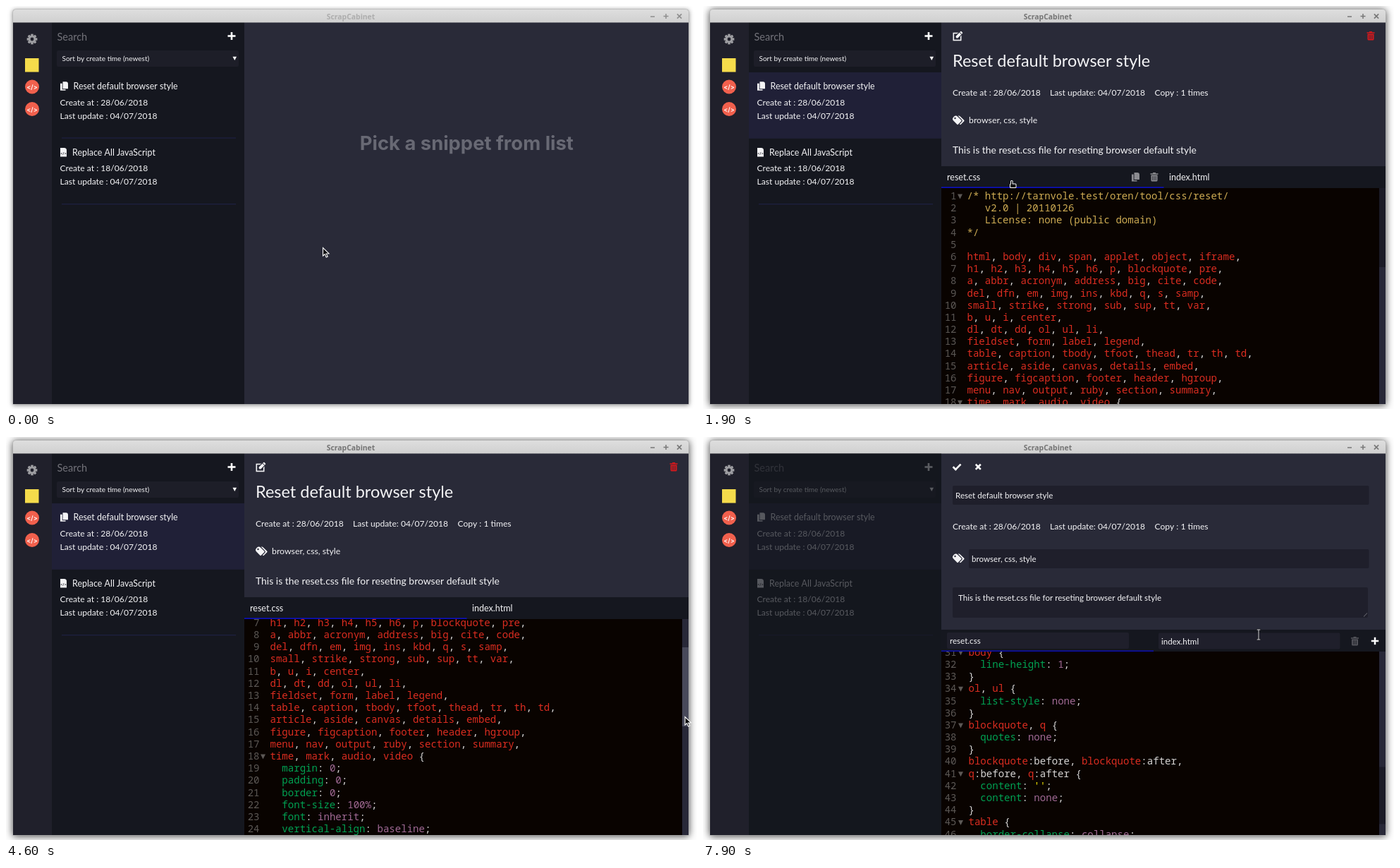
An HTML page with a canvas for the animation above (8000 ms loop, 980 by 571 pixels).

```html
<!DOCTYPE html>
<html lang="en">
<head>
<meta charset="utf-8">
<title>Snippet manager</title>
<style>
html, body { margin: 0; width: 100%; height: 100%; overflow: hidden; background: #fff; }
canvas { display: block; width: 980px; height: 571px; }
</style>
</head>
<body>
<canvas id="stage"></canvas>
<script>
const W = 980, H = 571, LOOP = 8000, STEP = 100;
const canvas = document.getElementById('stage');
const c = canvas.getContext('2d');
const dpr = window.devicePixelRatio || 1;
canvas.width = W * dpr;
canvas.height = H * dpr;

const UI = 'Lato, sans-serif', MONO = '"Noto Sans Mono", monospace';
const SIDE = '#20202b', LIST = '#15171f', PANEL = '#292a38', FIELD = '#1f1f2b';
const WHITE = '#f4f4f6', GREY = '#8b8b90', BLUE = '#0c10b4', TRACK = '#282838';
const CODE = { bg: '#090300', text: '#d6d5d4', num: '#5c5855', note: '#cdab53',
  tag: '#db2d20', prop: '#01a252', value: '#a16a94', string: '#fded02' };
const LINE = 17.19, CODE_SIZE = 14.07, CHAR = CODE_SIZE * .6;
const TITLE = 'Reset default browser style', TAGS = 'browser, css, style';
const ABOUT = 'This is the reset.css file for reseting browser default style';

// Moments when the state changes.
const FOCUS = 300, OPEN = 1300, GRAB = 3900, RELEASE = 5700, EDIT = 6800;
const GRIP_Y = 357.8, SCROLL_PER_PX = 2.86;

// Pointer path: start, end, then the place it reaches.
const home = { x: 449, y: 342 };
const moves = [
  [300, 1100, 288, 149],
  [1500, 1900, 438, 247],
  [1900, 2400, 735, 240],
  [2700, 3300, 492, 120],
  [3300, 3600, 966, 395],
  [3700, GRAB, 964, GRIP_Y],
  [GRAB, 4600, 962.5, 396],
  [4600, 5200, 958, 539.3],
  [5500, RELEASE, 957, 541.7],
  [RELEASE, 6600, 357, 37],
  [EDIT, 7200, 338, 38],
  [7300, 7900, 788, 280]
];

const css = `/* http://tarnvole.test/oren/tool/css/reset/
   v2.0 | 20110126
   License: none (public domain)
*/

html, body, div, span, applet, object, iframe,
h1, h2, h3, h4, h5, h6, p, blockquote, pre,
a, abbr, acronym, address, big, cite, code,
del, dfn, em, img, ins, kbd, q, s, samp,
small, strike, strong, sub, sup, tt, var,
b, u, i, center,
dl, dt, dd, ol, ul, li,
fieldset, form, label, legend,
table, caption, tbody, tfoot, thead, tr, th, td,
article, aside, canvas, details, embed,
figure, figcaption, footer, header, hgroup,
menu, nav, output, ruby, section, summary,
time, mark, audio, video {
  margin: 0;
  padding: 0;
  border: 0;
  font-size: 100%;
  font: inherit;
  vertical-align: baseline;
}
/* HTML5 display-role reset for older browsers */
article, aside, details, figcaption, figure,
footer, header, hgroup, menu, nav, section {
  display: block;
}
body {
  line-height: 1;
}
ol, ul {
  list-style: none;
}
blockquote, q {
  quotes: none;
}
blockquote:before, blockquote:after,
q:before, q:after {
  content: '';
  content: none;
}
table {
  border-collapse: collapse;
  border-spacing: 0;
}`;

// Splits the stylesheet into lines of [text, colour] tokens.
function tokenize(source) {
  let comment = false;
  return source.split('\n').map((line, i) => {
    let tokens;
    const rule = line.match(/^(\s+[\w-]+)(: )(.+)(;)$/);
    if (line.startsWith('/*')) comment = true;
    if (comment) {
      tokens = [[line, CODE.note]];
    } else if (rule) {
      const value = rule[3][0] === "'" ? CODE.string : CODE.value;
      tokens = [[rule[1], CODE.prop], [rule[2], CODE.text], [rule[3], value], [rule[4], CODE.text]];
    } else {
      tokens = line.split(/(:?\w+)/).map(s => [s, /^\w/.test(s) ? CODE.tag : CODE.text]);
    }
    if (line.endsWith('*/')) comment = false;
    return { tokens, fold: i === 0 || line.endsWith('{') };
  });
}
const lines = tokenize(css);

function pointer(t) {
  let { x, y } = home;
  for (const [start, end, toX, toY] of moves) {
    if (t <= start) break;
    const u = 1 - (1 - Math.min(1, (t - start) / (end - start))) ** 1.5;
    x += (toX - x) * u;
    y += (toY - y) * u;
  }
  return { x, y };
}

function scrollAt(t) {
  if (t < GRAB) return 0;
  return (pointer(Math.min(t, RELEASE)).y - GRIP_Y) * SCROLL_PER_PX;
}

function box(x, y, w, h, color, r = 0) {
  c.fillStyle = color;
  c.beginPath();
  c.roundRect(x, y, w, h, r);
  c.fill();
}

function disc(x, y, r, color) {
  c.fillStyle = color;
  c.beginPath();
  c.arc(x, y, r, 0, Math.PI * 2);
  c.fill();
}

function turned(x, y, angle, paint) {
  c.save();
  c.translate(x, y);
  c.rotate(angle);
  paint();
  c.restore();
}

function text(s, x, y, size, color = WHITE, weight = 400, family = UI, align = 'left') {
  c.font = `${weight} ${size}px ${family}`;
  c.fillStyle = color;
  c.textAlign = align;
  c.fillText(s, x, y);
}

function triangle(x, y, w, h, color) {
  c.fillStyle = color;
  c.beginPath();
  c.moveTo(x, y);
  c.lineTo(x + w, y);
  c.lineTo(x + w / 2, y + h);
  c.fill();
}

function plus(x, y, r, width, color, angle = 0) {
  turned(x, y, angle, () => {
    box(-r, -width / 2, r * 2, width, color);
    box(-width / 2, -r, width, r * 2, color);
  });
}

function cross(x, y, r, width, color) {
  plus(x, y, r, width, color, Math.PI / 4);
}

function copyIcon(x, y, color, back) {
  box(x, y + 2.5, 7.5, 10, color);
  box(x + 2.7, y - .8, 9, 11.8, back);
  box(x + 3.5, y, 7.5, 10, color, [0, 3, 0, 0]);
}

function trashIcon(x, y, color, back) {
  box(x, y + 1.2, 11, 1.5, color);
  box(x + 3.5, y, 4, 1.6, color);
  box(x + 1, y + 3.5, 9, 9, color, [0, 0, 1.5, 1.5]);
  for (let i = 0; i < 3; i++) box(x + 2.9 + i * 2.2, y + 5, .8, 6, back);
}

function fileIcon(x, y) {
  box(x, y, 9, 12.5, WHITE, [0, 3.5, 0, 0]);
  text('</>', x + 4.5, y + 10, 4.6, LIST, 700, MONO, 'center');
}

function tagsIcon(x, y) {
  for (const [dx, edge] of [[4, 0], [0, 1.2]]) {
    turned(x + dx + 6, y + 6, Math.PI / 4, () => {
      box(-6.3 - edge, -4.2 - edge, 12 + edge * 2, 8.4 + edge * 2, PANEL, 2);
      box(-6.3, -4.2, 12, 8.4, WHITE, [4, 1, 1, 4]);
    });
  }
  disc(x + 3.5, y + 3.5, 1.2, PANEL);
}

function pencilIcon(x, y) {
  c.strokeStyle = WHITE;
  c.lineWidth = 1.6;
  c.strokeRect(x + .8, y + 2.5, 10.4, 10);
  turned(x + 8.5, y + 5, -Math.PI / 4, () => {
    box(-6, -3, 14, 6, PANEL);
    box(-5.5, -1.9, 11.5, 3.8, WHITE, [2, 1, 1, 2]);
    box(2.8, -1.9, .8, 3.8, PANEL);
  });
}

function checkIcon(x, y) {
  turned(x, y, Math.PI / 4, () => {
    box(-4.5, 0, 6.5, 2.6, '#fff');
    box(-.6, -9, 2.6, 11.6, '#fff');
  });
}

function gear(x, y) {
  for (let i = 0; i < 4; i++) plus(x, y, 7.2, 3.2, '#9c9ca0', i * Math.PI / 4);
  disc(x, y, 5.4, '#9c9ca0');
  disc(x, y, 2.4, SIDE);
}

function codeBadge(x, y) {
  disc(x, y, 10, '#f1604d');
  text('</>', x, y + 3.5, 9, '#fff', 600, 'Inter, sans-serif', 'center');
}

function drawWindow(focused) {
  c.fillStyle = '#fff';
  c.fillRect(0, 0, W, H);
  c.save();
  c.shadowColor = focused ? 'rgba(0,0,0,.75)' : 'rgba(0,0,0,.5)';
  c.shadowBlur = (focused ? 11 : 6) * dpr;
  c.shadowOffsetY = dpr;
  box(9.5, 4.5, 959, 560, '#b4b4b4', [4, 4, 0, 0]);
  c.restore();
  const bar = c.createLinearGradient(0, 5, 0, 23);
  bar.addColorStop(0, '#dedede');
  bar.addColorStop(1, '#d0d0d0');
  box(10, 5, 958, 18.5, bar, [4, 4, 0, 0]);
  const ink = focused ? '#757575' : '#adadad', mark = focused ? '#777' : '#8e8e8e';
  text('ScrapCabinet', 489, 18.5, 10.4, ink, 700, '"Noto Sans", sans-serif', 'center');
  box(914, 14.3, 6, 1.5, mark);
  plus(936, 14.5, 3.5, 1.5, mark);
  cross(955, 14.5, 4.4, 1.6, mark);
  box(10, 23.5, 55, 540.5, SIDE);
  gear(37, 47);
  box(27, 74, 19.5, 19.5, '#f5dc4b');
  codeBadge(37, 114.5);
  codeBadge(37, 146);
}

function listItem(y, title, titleX, icon, created, fill) {
  if (fill) box(65, y, 273, 93.7, fill);
  else box(79, y + 92.6, 247, 1, '#20234a');
  icon(77, y + 13.2, WHITE, fill || LIST);
  text(title, titleX, y + 24.2, 12.43);
  text('Create at : ' + created, 76.5, y + 46.7, 12.1);
  text('Last update : 04/07/2018', 76.5, y + 65.5, 12.1);
}

function drawList(s) {
  box(65, 23.5, 273, 540.5, LIST);
  text('Search', 72.5, 48.5, 14.5, '#73737a');
  plus(320, 42.5, 5.5, 2.6, '#fff');
  box(72, 63, 258, 23, '#1d1e28', 2);
  text('Sort by create time (newest)', 79.5, 78, 10.05);
  triangle(321.5, 71.8, 5.6, 5.3, '#fff');
  const hover = y => !s.open && within(s, [65, y, 273, 93]) ? '#25263f' : null;
  listItem(94, TITLE, 95.5, copyIcon, '28/06/2018', s.open ? '#202037' : hover(94));
  listItem(187.7, 'Replace All JavaScript', 94, fileIcon, '18/06/2018', hover(188));
  if (s.edit) {
    c.globalAlpha = .7;
    box(65, 23.5, 273, 540.5, LIST);
    c.globalAlpha = 1;
  }
}

function drawCode(top, s, shift) {
  const height = 564 - top, total = 836;
  c.save();
  c.beginPath();
  c.rect(338, top, 630, height);
  c.clip();
  box(338, top, 630, height, CODE.bg);
  lines.forEach((line, i) => {
    const y = top + 16 + i * LINE - s.scroll;
    text(String(i + 1), 359.5, y, CODE_SIZE, CODE.num, 400, MONO, 'right');
    if (line.fold) triangle(361 + shift / 2, y - 7.5, 7, 7, CODE.num);
    let x = 374.5 + shift;
    for (const [part, color] of line.tokens) {
      text(part, x, y, CODE_SIZE, color, 400, MONO);
      x += part.length * CHAR;
    }
  });
  box(959, top, 9, height, TRACK);
  const ratio = height / total;
  box(959, top + s.scroll * ratio, 9, height * ratio, s.drag ? '#48495a' : '#1b1b27');
  c.restore();
}

function drawMeta(y) {
  text('Create at : 28/06/2018', 354, y, 12.1);
  text('Last update: 04/07/2018', 492, y, 12.1);
  text('Copy : 1 times', 640.5, y, 12.1);
}

const TABS = [338, 227, 630, 31];

function drawDetail(s) {
  pencilIcon(354.5, 36);
  trashIcon(941.5, 36, '#d6191d', PANEL);
  text(TITLE, 354, 86, 23.5);
  drawMeta(126.7);
  tagsIcon(354, 155.5);
  text(TAGS, 377, 166.3, 12.3);
  text(ABOUT, 354, 209.3, 13.93);
  box(...TABS, LIST);
  text('reset.css', 346, 247.3, 12.55);
  text('index.html', 661, 247.3, 12.55);
  if (within(s, TABS)) {
    const left = s.x < 653 ? 338 : 653;
    copyIcon(left + 270, 236, GREY, LIST);
    trashIcon(left + 296.5, 236, GREY, LIST);
  }
  drawCode(258, s, 0);
  box(338, 256.3, 315.5, 1.7, BLUE);
}

const fields = [
  { area: [354, 69, 590.5, 27], value: TITLE },
  { area: [377, 159, 567.5, 27], value: TAGS },
  { area: [354, 213, 589, 43], value: ABOUT, pad: 8 },
  { area: [346, 277, 258, 23], value: 'reset.css' },
  { area: [646, 277.5, 257.5, 23], value: 'index.html' }
];

function drawEditor(s) {
  checkIcon(358.7, 44.5);
  cross(390.3, 42.3, 5, 2.6, '#fff');
  drawMeta(131.4);
  tagsIcon(354, 165.5);
  box(338, 273, 630, 31, LIST);
  for (const { area, value, pad = 4 } of fields) {
    const [x, y, , h] = area;
    box(...area, FIELD, 2);
    text(value, x + pad, y + Math.min(h, 28) / 2 + 4.7, 11.6);
  }
  for (let i = 1; i < 6; i++) box(942 - i, 248.5 + i, 1, 1, '#77777e');
  if (s.y > 273 && s.y < 304) trashIcon(s.x < 639 ? 618.5 : 919, 283, '#55555c', LIST);
  plus(953, 289, 5.2, 2.5, '#fff');
  drawCode(304, s, 2);
  box(338, 302.5, 301, 1.5, BLUE);
}

function within(s, [x, y, w, h]) {
  return s.x >= x && s.x <= x + w && s.y >= y && s.y <= y + h;
}

function cursorKind(s) {
  if (s.edit) return fields.some(f => within(s, f.area)) ? 'beam' : 'arrow';
  if (within(s, [65, 94, 272, 187])) return 'hand';
  if (!s.open) return 'arrow';
  if (within(s, TABS) || within(s, [352, 34, 18, 17])) return 'hand';
  if (within(s, [354, 66, 365, 150]) || within(s, [338, 258, 617, 306])) return 'beam';
  return 'arrow';
}

// Each part is drawn first as a wider rim, then filled.
function rimmed(parts, rim, ink, rimColor) {
  for (const [x, y, w, h] of parts) box(x - rim, y - rim, w + rim * 2, h + rim * 2, rimColor, 1.5);
  for (const part of parts) box(...part, ink, .5);
}

function arrow() {
  c.beginPath();
  c.moveTo(.5, .5);
  c.lineTo(.5, 12);
  c.lineTo(3.2, 9.6);
  c.lineTo(5.2, 14);
  c.lineTo(7.2, 13);
  c.lineTo(5.2, 9);
  c.lineTo(9, 8.8);
  c.closePath();
  c.fillStyle = '#0b0b0d';
  c.strokeStyle = '#fff';
  c.lineWidth = 1.1;
  c.fill();
  c.stroke();
}

function drawCursor(s) {
  const kind = cursorKind(s);
  c.save();
  c.translate(s.x, s.y);
  if (kind === 'arrow') arrow();
  else if (kind === 'hand') rimmed([[-1, 1, 1.6, 8], [-2, 5.5, 7.5, 4.5]], 1, '#0b0b0d', '#fff');
  else rimmed([[-2.5, -7.5, 5, 1], [-.5, -7, 1, 14], [-2.5, 6.5, 5, 1]], .8, '#d8d8dc', '#15151a');
  c.restore();
}

function draw(t) {
  const s = { ...pointer(t), scroll: scrollAt(t), open: t >= OPEN, edit: t >= EDIT,
    drag: t >= GRAB && t < RELEASE };
  c.setTransform(dpr, 0, 0, dpr, 0, 0);
  drawWindow(t >= FOCUS);
  drawList(s);
  box(338, 23.5, 630, 540.5, PANEL);
  if (s.edit) drawEditor(s);
  else if (s.open) drawDetail(s);
  else text('Pick a snippet from list', 653.3, 204, 27.4, '#686974', 700, 'Inter, sans-serif', 'center');
  drawCursor(s);
}

function tick() {
  const t = performance.now() % LOOP;
  draw(Math.floor(t / STEP) * STEP);
  requestAnimationFrame(tick);
}
tick();
</script>
</body>
</html>
```
